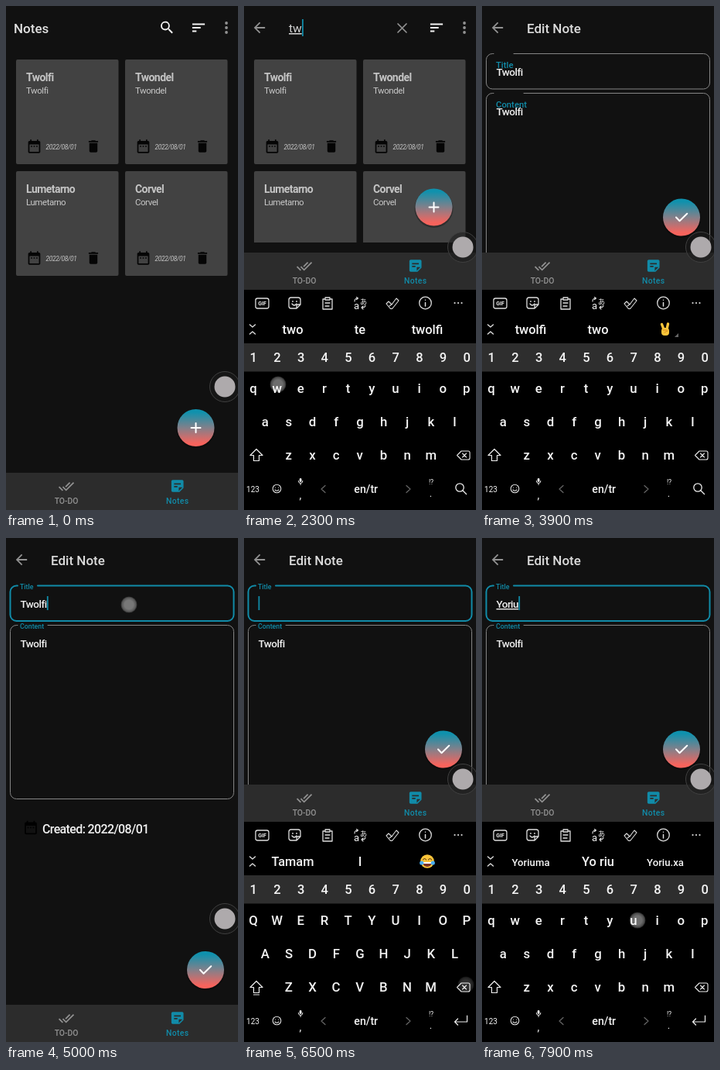
An HTML page that plays this animation: 300x650 px, repeating every 8000 ms.

```html
<!DOCTYPE html>
<html lang="en">
<head>
<meta charset="utf-8">
<title>Notes</title>
<style>
  html, body { margin: 0; width: 100%; height: 100%; overflow: hidden; background: #111; }
  svg { display: block; width: 100vw; height: 100vh; font-family: Roboto, sans-serif; }
  .note { font-stretch: 75%; letter-spacing: -.04em; }
  .label { font-weight: 500; }
  .touch { mix-blend-mode: screen; }
  .line { fill: none; stroke-linecap: round; stroke-linejoin: round; }
  text { white-space: pre; }
</style>
</head>
<body>
<svg id="stage" viewBox="0 0 300 650">
  <defs>
    <linearGradient id="fab" x1="0" y1="0" x2="0" y2="1">
      <stop offset=".08" stop-color="#0f91ad"/><stop offset=".5" stop-color="#82808a"/><stop offset=".92" stop-color="#f8635c"/>
    </linearGradient>
    <radialGradient id="dot">
      <stop offset=".55" stop-color="#aaa" stop-opacity=".8"/><stop offset=".85" stop-color="#888" stop-opacity=".7"/><stop offset="1" stop-color="#666" stop-opacity=".4"/>
    </radialGradient>
    <clipPath id="listClip"><rect id="listArea" width="300" height="589"/></clipPath>
  </defs>
  <g id="page"></g>
  <g id="bottom"></g>
  <g id="keyboard"></g>
  <g id="overlay"></g>
</svg>
<script>
const LOOP = 8000, STEP = 100, KB_HEIGHT = 284;
const TEAL = '#118ba8', GRAY = '#929292';
const byId = id => document.getElementById(id);

const ICONS = {
  calendar: 'M9 11H7v2h2v-2zm4 0h-2v2h2v-2zm4 0h-2v2h2v-2zm2-7h-1V2h-2v2H8V2H6v2H5c-1.1 0-2 .9-2 2v14c0 1.1.9 2 2 2h14c1.1 0 2-.9 2-2V6c0-1.1-.9-2-2-2zm0 16H5V9h14z',
  trash: 'M6 19c0 1.1.9 2 2 2h8c1.1 0 2-.9 2-2V7H6zM19 4h-3.5l-1-1h-5l-1 1H5v2h14z',
  search: 'M15.5 14h-.79l-.28-.27A6.5 6.5 0 1 0 13.73 14.43l.27.28v.79l5 4.99L20.49 19zM9.5 14a4.5 4.5 0 1 1 0-9a4.5 4.5 0 0 1 0 9z',
  sort: 'M3 18h6v-2H3zM3 6v2h18V6zm0 7h12v-2H3z',
  back: 'M20 11H7.83l5.59-5.59L12 4l-8 8 8 8 1.41-1.41L7.83 13H20z',
  doneAll: 'M18 7l-1.41-1.41-6.34 6.34 1.41 1.41zm4.24-1.41L11.66 16.17 7.48 12l-1.41 1.41L11.66 19l12-12zM.41 13.41L6 19l1.41-1.41L1.83 12z',
  sticky: 'M19 3H5c-1.1 0-2 .9-2 2v14c0 1.1.9 2 2 2h10l6-6V5c0-1.1-.9-2-2-2zM7 8h10v2H7zm5 6H7v-2h5zm2 5.5V14h5.5z'
};

// Icons sit on a 24 unit grid, centred on x, y.
const icon = (name, x, y, fill, s = .87) =>
  `<path transform="translate(${x - 12 * s} ${y - 12 * s}) scale(${s})" fill="${fill}" fill-rule="evenodd" d="${ICONS[name]}"/>`;
const text = (s, x, y, size, fill, extra = '') =>
  `<text x="${x}" y="${y}" font-size="${size}" fill="${fill}" ${extra}>${s}</text>`;
const mid = (s, x, y, size, fill = '#f4f4f4', extra = '') => text(s, x, y, size, fill, 'text-anchor="middle" ' + extra);
const note = (s, x, y, size, fill, extra = '') => text(s, x, y, size, fill, 'class="note" ' + extra);
const line = (d, color = '#ddd', w = 1.3) => `<path class="line" d="${d}" stroke="${color}" stroke-width="${w}"/>`;
const circle = (x, y, r, attrs) => `<circle cx="${x}" cy="${y}" r="${r}" ${attrs}/>`;
const rect = (x, y, w, h, attrs) => `<rect x="${x}" y="${y}" width="${w}" height="${h}" ${attrs}/>`;
const latest = (list, t) => list.filter(e => e[0] <= t).pop();

const NOTES = ['Twolfi', 'Twondel', 'Lumetarno', 'Corvel'];
const QUERY = [[1000, ''], [1800, 't'], [2200, 'tw'], [2900, 'two']];
const TITLE = [
  [0, 'Twolfi'], [4900, 'Twolfi'], [5600, 'Twolf'], [5800, 'Twol'], [5900, 'Two'], [6000, 'Tw'], [6100, 'T'], [6200, ''],
  [6900, 'Y'], [7200, 'Yo'], [7400, 'Yor'], [7600, 'Yori'], [7800, 'Yoriu']
];
const HINTS = [
  [0, 'tamam', 'I', ':joy'], [1800, 'the', 't', 'to'], [2200, 'two', 'te', 'twolfi'], [2500, 'twolfi', 'two', 'te'],
  [2900, 'twolfi', 'two', ':victory'], [5000, 'twolfi', 'two', 'I'], [6200, 'Tamam', 'I', ':joy'],
  [6900, 'You', 'Y', 'Yes'], [7200, 'Yok', 'Yo', 'You'], [7400, 'Your', 'Yor', 'Yorum'],
  [7600, 'Yoriuma', 'Yori', 'Yorum'], [7800, 'Yoriuma', 'Yo riu', 'Yoriu.xa']
];
// x, y, start, end
const TOUCHES = [
  [208, 28, 700, 1000], [136, 496, 1700, 2000], [44, 488, 2100, 2500], [257, 493, 2800, 3100], [98, 137, 3300, 3700],
  [159, 86, 4800, 5200], [287, 576, 5500, 6600], [165, 493, 6800, 7000], [257, 495, 7100, 7300],
  [104, 493, 7300, 7500], [227, 493, 7500, 7700], [201, 493, 7700, 8100]
];

const isOpen = t => (t >= 1100 && t < 4100) || t >= 5100;
function keyboardOffset(t) {
  const rise = start => KB_HEIGHT * (1 - Math.min(1, Math.max(0, (t - start) / 265))) ** 3;
  if (t < 4100) return rise(1000);
  if (t < 5100) return KB_HEIGHT * Math.min(1, (t - 4000) / 300) ** 2;
  return rise(5050);
}
const cursorOn = (t, since) => (t - since) % 1000 < 500;

function card(name, i) {
  const x = 13 + 141 * (i % 2), y = 69 + 144 * (i >> 1);
  return `<g transform="translate(${x} ${y})">` + rect(0, 0, 132.5, 135, 'rx="2" fill="#424242"') +
    note(name, 13, 28, 14, '#c4c4c4', 'font-weight="700"') + note(name, 13, 44, 11.5, '#c8c8c8') +
    icon('calendar', 23.5, 112, '#050505') + note('2022/08/01', 38.5, 116, 8.4, '#c4c4c4', 'font-style="italic"') +
    icon('trash', 100, 112, '#050505') + '</g>';
}

function listPage(t) {
  const searching = t >= 1000;
  const names = t >= 2500 ? NOTES.slice(0, 2) : NOTES;
  let out = icon('sort', 249, 28, '#f4f4f4', .9) + [22, 28, 34].map(y => circle(285, y, 1.9, `fill="${GRAY}"`)).join('');
  if (searching) {
    const [since, query] = latest(QUERY, t);
    out += icon('back', 20, 28, GRAY, .9) + (query
      ? text(query, 58, 34, 15.5, '#d4d4d4', 'id="typed" text-decoration="underline"') + line('M199 23l11 11M210 23l-11 11', GRAY, 1.7)
      : text('Search...', 58, 34, 15.2, '#858585'));
    if (cursorOn(t, since)) out += rect(query ? 75 : 57.5, 17, 1.8, 22, `id="cursor" fill="${TEAL}"`);
  } else {
    out += text('Notes', 10, 34.5, 17, '#e0e0e0', 'font-weight="500"') + icon('search', 208.2, 27.8, '#f4f4f4', .9);
  }
  return out + `<g clip-path="url(#listClip)">${names.map(card).join('')}</g>`;
}

function field(label, y, h, gapEnd, focused, rise) {
  const b = y + h, stroke = focused ? TEAL : '#858585';
  return line(`M15 ${y}H13.5a8 8 0 0 0-8 8V${b - 8}a8 8 0 0 0 8 8H286.5a8 8 0 0 0 8-8V${y + 8}a8 8 0 0 0-8-8H${gapEnd}`, stroke, focused ? 2 : 1) +
    text(label, 18, y + 28 - 24 * rise, 13 - 4.2 * rise, TEAL, 'class="label"');
}

function editPage(t) {
  const rise = t < 3900 ? 0 : t < 4000 ? .4 : 1;
  const focused = t >= 4900;
  const [since, title] = latest(TITLE, t);
  const underline = t >= 6900 ? 'text-decoration="underline"' : '';
  let out = icon('back', 20, 28, GRAY, .9) + text('Edit Note', 58, 34.5, 17, '#dcdcdc', 'font-weight="500"') +
    field('Title', 61.5, 45.5, 41, focused, rise) + field('Content', 112.5, 224, 54, false, rise) +
    note(title, 18.5, 90, 13.5, '#f0f0f0', `id="typed" font-weight="500" ${underline}`) +
    note(NOTES[0], 18.5, 141, 13.5, '#f0f0f0', 'font-weight="500"') +
    icon('calendar', 32, 373.5, '#000') + note('Created: 2022/08/01', 47, 381, 16, '#f0f0f0', 'font-weight="500"');
  if (focused && cursorOn(t, since)) out += rect(18.5, 75, 1.8, 18, `id="cursor" fill="${TEAL}"`);
  return out;
}

function bottomBar(t, editing) {
  const open = isOpen(t), y = open ? -KB_HEIGHT : 0;
  const [fx, fy] = editing ? [258, open ? 272.5 : 557] : [245.5, open ? 259.5 : 544];
  return circle(fx, fy + 1.5, 25, 'fill="#000" opacity=".3"') + circle(fx, fy, 24, 'fill="url(#fab)"') +
    `<g transform="translate(${fx} ${fy})">` + line(editing ? 'M-7 0l4.5 4.7L7.2-4.8' : 'M-6 0H6M0-6V6', '#fff', 2) + '</g>' +
    (open ? rect(0, 366, 300, 284, 'fill="#000"') : '') +
    `<g transform="translate(0 ${y})">` + rect(0, 602, 300, 48, 'fill="#2c2c2c"') +
    icon('doneAll', 78, 619.5, GRAY) + mid('TO-DO', 78, 642, 10.4, GRAY, 'font-weight="500"') +
    icon('sticky', 221.7, 619, TEAL) + mid('Notes', 221.7, 642, 10.4, TEAL, 'font-weight="500" letter-spacing=".3"') + '</g>';
}

function emoji(name) {
  if (name === ':joy') {
    return circle(237, 417, 8.8, 'fill="#fbc53a"') + line('M231.5 415q2-3 4 0M238.5 415q2-3 4 0', '#6b4313', 1.2) +
      '<path d="M231 418h12a6 6 0 0 1-12 0z" fill="#7c3428"/><path d="M232 418h10v2h-10z" fill="#fff"/>' +
      circle(229.7, 419, 2.6, 'fill="#4aaef0"') + circle(244.3, 419, 2.6, 'fill="#4aaef0"');
  }
  return line('M235 417l-2.5-6.5M239 417l1.5-7', '#fbc53a', 3.4) + rect(232, 415, 10, 10, 'rx="4" fill="#fbc53a"') +
    line('M234 418h5M236 421l4-2', '#d48a22', 1) + '<path d="M254 422v5h-5z" fill="#666"/>';
}

function toolbar() {
  return rect(15, 377, 17, 13, 'rx="2.5" fill="none" stroke="#ddd" stroke-width="1.3"') + mid('GIF', 23.5, 386, 7, '#eee', 'font-weight="700"') +
    line('M61 376h9q3 0 3 3v6l-5 5h-7q-3 0-3-3v-8q0-3 3-3zM73 385h-3q-2 0-2 2v3M62 384q3 4 6 0') +
    circle(63, 381, .9, 'fill="#ddd"') + circle(68, 381, .9, 'fill="#ddd"') +
    line('M104 378h-2v13h12v-13h-2M105 376h6v3h-6zM105 383h6M105 387h5') +
    mid('a', 145.5, 391, 13) + mid('あ', 154.5, 384.5, 9.5, '#eee', 'font-family="Noto Sans CJK JP, Noto Sans CJK, sans-serif"') +
    line('M143 381q0-4 4-4M145.5 375.5l2 1.5-2 1.5M157 386q0 3-5 3M154 387l-2 2 2 2', '#ddd', 1.1) +
    line('M184 384l3-3 4 4 6-8 3 3-8 10q-1.5 1-3 0zM188 387l4-3', '#ddd', 1.1) +
    circle(234.5, 383, 7.8, 'fill="none" stroke="#ddd" stroke-width="1.3"') + line('M234.5 382.5v4.5M234.5 379.2v.1', '#ddd', 1.5) +
    [272.5, 277, 281.5].map(x => circle(x, 383, 1.1, 'fill="#ddd"')).join('');
}

function keyRow(keys, x, y, size = 16.8) {
  return [...keys].map((k, i) => mid(k, x + 30.65 * i, y, size, '#f4f4f4', 'font-weight="500"')).join('');
}

function hints(t) {
  return latest(HINTS, t).slice(1).map((s, i) =>
    s[0] === ':' ? emoji(s) : mid(s, 63 + 87 * i, 423, s.length > 6 ? 13.2 : 16.4, '#f4f4f4', 'font-weight="500"')).join('');
}

function keyboard(t) {
  const caps = t >= 6200 && t < 6900;
  const shape = s => caps ? s.toUpperCase() : s;
  return rect(0, 366, 300, 300, 'fill="#000"') + toolbar() +
    line('M7.5 411l3.5 3 3.5-3M7.5 423l3.5-3 3.5 3', '#ddd', 1.4) + hints(t) +
    rect(0, 435, 300, 36.5, 'fill="#2e2e2e"') + keyRow('1234567890', 12.3, 459, 16.5) +
    keyRow(shape('qwertyuiop'), 12, 498.5) + keyRow(shape('asdfghjkl'), 27.3, 542) + keyRow(shape('zxcvbnm'), 57.8, 585) +
    line('M16 571.5l8 8h-4.5v7h-7v-7H8z' + (caps ? 'M12.5 589h7' : ''), '#eee', 1.2) +
    line('M281 574h9q2 0 2 2v7q0 2-2 2h-9l-5.5-5.5zM282.5 577l5 5M287.5 577l-5 5', '#eee', 1.1) +
    mid('123', 11.5, 627, 10) + circle(42.5, 622.5, 5.3, 'fill="none" stroke="#ddd" stroke-width="1.1"') +
    line('M40.4 621v.1M44.6 621v.1M40 624q2.5 2.5 5 0', '#ddd', 1.1) +
    rect(71.7, 609, 2.8, 5, 'rx="1.4" fill="#eee"') + line('M70.3 612.5q0 3 2.8 3t2.8-3M73.1 615.5v2', '#eee', 1) +
    mid(',', 73, 636, 14) + line('M105 618.5l-5 4.5 5 4.5M210 618.5l5 4.5-5 4.5', '#666', 1.2) +
    mid('en/tr', 157.7, 627.5, 14.2, '#f4f4f4', 'font-weight="500"') + mid('!?', 242, 617, 8.5) + mid('.', 241.5, 633, 13) +
    (t < 5000 ? circle(279, 621, 5.2, 'fill="none" stroke="#eee" stroke-width="1.3"') + line('M283 625l4.5 4.5', '#eee', 1.3)
      : line('M288.5 616v8h-16M276.5 620l-4 4 4 4', '#eee', 1.2));
}

function overlay(t) {
  const y = isOpen(t) ? 311 : 491;
  return circle(283, y, 19.5, 'fill="#1a1a1a" fill-opacity=".55" stroke="#404040" stroke-width="1"') +
    circle(283, y, 13.5, 'fill="#aeaaac"') +
    TOUCHES.filter(p => t >= p[2] && t < p[3]).map(p =>
      circle(p[0], p[1], 10.5, `class="touch" fill="url(#dot)" opacity="${t >= p[3] - 100 ? .35 : .8}"`)).join('');
}

function draw(t) {
  const editing = t >= 3800, offset = keyboardOffset(t);
  byId('listArea').setAttribute('height', isOpen(t) ? 305 : 589);
  byId('page').innerHTML = rect(0, 0, 300, 650, 'fill="#111"') + (editing ? editPage(t) : listPage(t));
  byId('bottom').innerHTML = bottomBar(t, editing);
  byId('keyboard').innerHTML = offset < KB_HEIGHT ? keyboard(t) : '';
  byId('keyboard').setAttribute('transform', `translate(0 ${offset})`);
  byId('overlay').innerHTML = overlay(t);
  const typed = byId('typed'), cursor = byId('cursor');
  if (typed && cursor && typed.textContent) {
    cursor.setAttribute('x', +typed.getAttribute('x') + typed.getComputedTextLength() + .3);
  }
}

let shown = -1;
const start = performance.now();
function tick() {
  const t = Math.floor((performance.now() - start) % LOOP / STEP) * STEP;
  if (t !== shown) draw(shown = t);
  requestAnimationFrame(tick);
}
tick();
</script>
</body>
</html>
```
